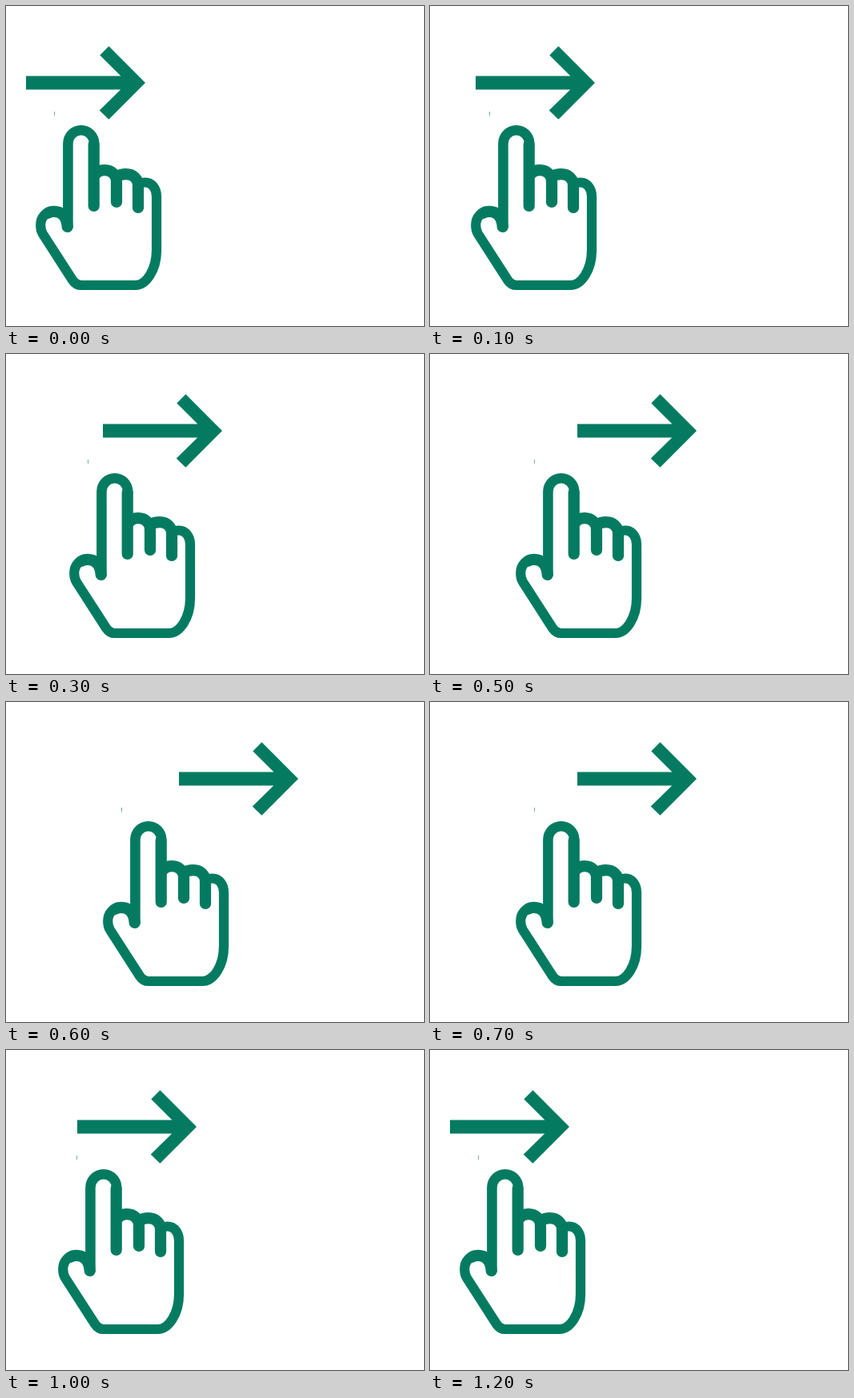
Animation, 522 px wide and 400 px high, one loop 1.3 s. Source, as an HTML page:

```html
<!DOCTYPE html>
<html lang="en">
<head>
<meta charset="utf-8">
<title>Swipe hint</title>
<style>
  html, body { margin: 0; width: 100%; height: 100%; overflow: hidden; background: #fff; }
  svg { display: block; width: 522px; height: 400px; }
</style>
</head>
<body>
<svg viewBox="0 0 522 400" fill="#047b60">
  <path id="arrow" d="M25 87.5H143.4L117.3 61.4 128.4 50.3 174 96 128.4 141.7 116.7 130.5 143.2 104.5H25Z"/>
  <g id="hand">
    <path d="M60 132h1v3l-.6 3h-.4Z" opacity=".6"/>
    <g fill="none" stroke="#047b60" stroke-width="12.6" stroke-linecap="round" stroke-linejoin="round">
      <!-- index finger -->
      <path d="M77.4 276V172A16.4 16.8 0 0 1 110.2 172"/>
      <!-- folded fingers -->
      <g stroke-width="14.2">
        <path d="M109.7 173V250"/>
        <path d="M111 211C114 207 118 205.2 123 205.2 132 205.2 138 211 138 220V245"/>
        <path d="M139 213C142 211 145 210.2 150 210.2 159 210.2 165 216 165 225V252"/>
      </g>
      <!-- little finger, palm and thumb -->
      <path stroke-width="12.2" d="M166 222C168 221 171 220.5 174 220.5 182 220.5 188 228 188 238V305C188 330 175 349 161.5 349H94C89 349 86 347 83 342.5L46 285C43.5 281 43.2 278 43.2 274 43.2 264 50 256.5 60 256.5"/>
      <path stroke-width="14.2" d="M52 259Q55.5 256.9 60 256.9C70 256.9 76 264 76.7 276"/>
    </g>
  </g>
</svg>
<script>
  const arrow = document.getElementById('arrow');
  const hand = document.getElementById('hand');
  const shift = (el, x) => el.setAttribute('transform', `translate(${x})`);

  function draw() {
    // six steps right, then six steps back, one every 100 ms
    const i = Math.floor(performance.now() % 1300 / 100);
    const step = Math.min(i, 12 - i);
    shift(arrow, Math.round(step * 31.85));
    shift(hand, step * 14);
    requestAnimationFrame(draw);
  }
  draw();
</script>
</body>
</html>
```
